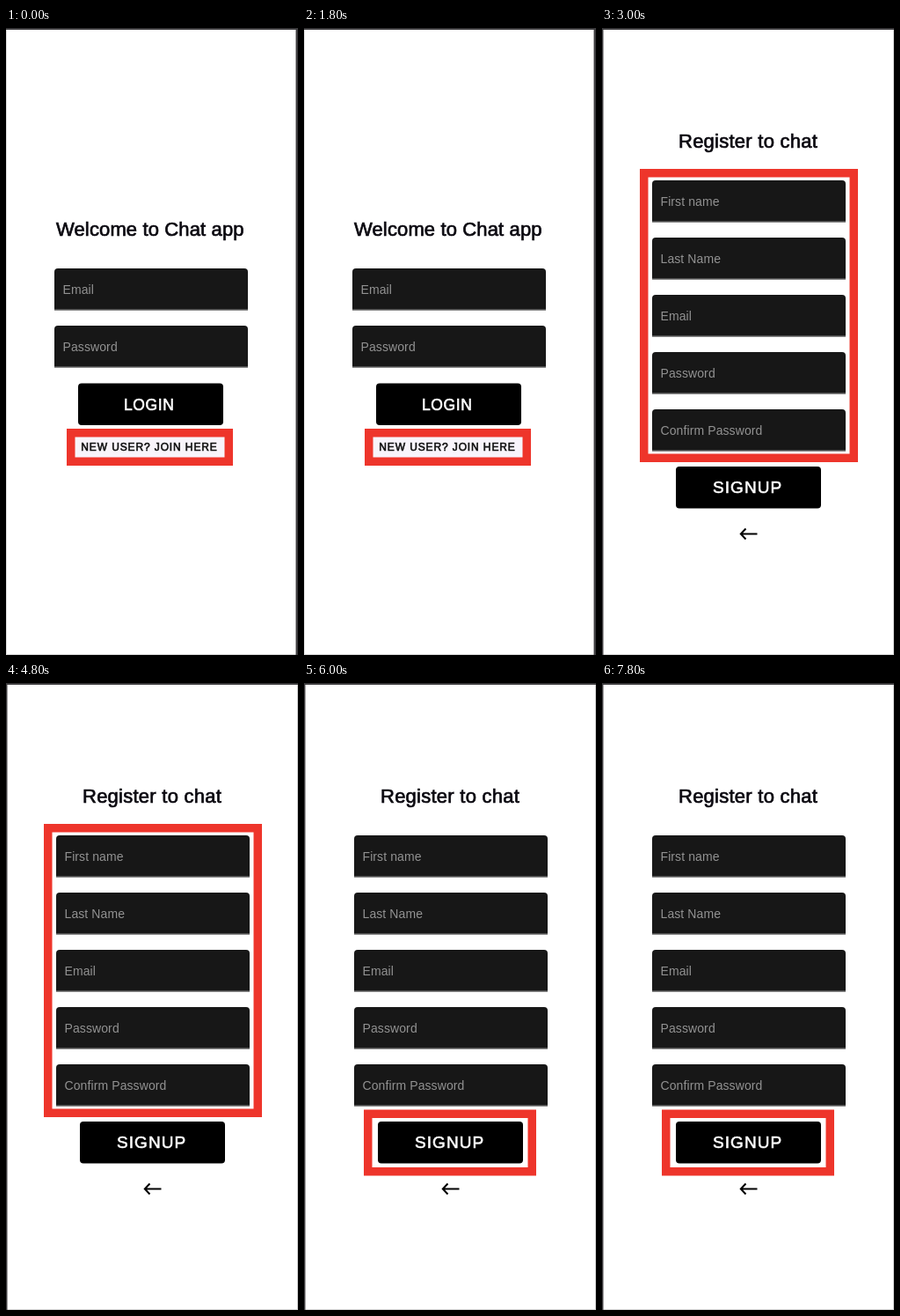
Write an HTML page with a canvas that moves like this. It is 332 px wide and 712 px high and loops after 9 s.

```html
<!DOCTYPE html>
<html lang="en">
<head>
<meta charset="utf-8">
<style>
  html, body { margin: 0; width: 100%; height: 100%; overflow: hidden; background: #fff; }
  canvas { display: block; }
</style>
</head>
<body>
<canvas width="332" height="712"></canvas>
<script>
const ctx = document.querySelector('canvas').getContext('2d');
const STEP = 3000;
const RED = '#ee352b', DARK = '#3a393b';

function rect(x, y, w, h, color, radius = 0) {
  ctx.fillStyle = color;
  ctx.beginPath();
  ctx.roundRect(x, y, w, h, radius);
  ctx.fill();
}

// A thin outline gives the text a medium weight.
function text(label, x, y, size, color, spacing = 0.1, outline = 0) {
  ctx.font = `${size}px "Liberation Sans", Arial, sans-serif`;
  ctx.letterSpacing = spacing + 'px';
  ctx.fillStyle = ctx.strokeStyle = color;
  ctx.fillText(label, x, y);
  if (outline) {
    ctx.lineWidth = outline;
    ctx.strokeText(label, x, y);
  }
}

function field(label, x, y) {
  rect(x, y, 220, 47.5, '#171717', [4, 4, 0, 0]);
  rect(x, y + 46.5, 220, 1, '#858585');
  text(label, x + 9.5, y + 29, 14, '#929292');
}

function button(label, x, y, textX, size, spacing) {
  rect(x, y, 165, 47.5, '#000', 4);
  text(label, textX, y + 30, size, '#fff', spacing, 0.6);
}

function highlight(x, y, w, h) {
  const border = 9.5;
  ctx.strokeStyle = RED;
  ctx.lineWidth = border;
  ctx.strokeRect(x + border / 2, y + border / 2, w - border, h - border);
}

function stage(left, leftWidth, right, rightWidth) {
  rect(0, 0, 332, 712, '#fff');
  rect(0, 711, 332, 1, '#d2d2d2');
  rect(0, 2, leftWidth, 710, left);
  rect(332 - rightWidth, 2, rightWidth, 710, right);
  rect(0, 0, 332, 2, DARK);
}

function login() {
  stage('#dcdcdc', 1, DARK, 2.5);
  text('Welcome to Chat app', 57, 235.5, 22, '#0b0910', 0.13, 0.7);
  field('Email', 55, 273);
  field('Password', 55, 338);
  button('LOGIN', 82, 403.5, 134, 17.5, 0.6);
  rect(78, 464, 172, 24, '#f8f4fb');
  text('NEW USER? JOIN HERE', 85.3, 479.5, 12, '#111', 0.88, 0.6);
  highlight(69, 455, 189, 42);
}

function register() {
  stage(DARK, 1.5, '#c4c4c4', 1);
  text('Register to chat', 87, 135.5, 22, '#0b0910', 0.25, 0.7);
  ['First name', 'Last Name', 'Email', 'Password', 'Confirm Password']
    .forEach((label, i) => field(label, 57, 173 + 65 * i));
  button('SIGNUP', 84, 498, 126, 19, 1.05);
  ctx.strokeStyle = '#000';
  ctx.lineWidth = 2;
  ctx.stroke(new Path2D('M176.5 574.5H158M163.5 568.5L157.8 574.5L163.5 580.5'));
}

function draw() {
  const scene = Math.floor(performance.now() / STEP) % 3;
  if (scene === 0) {
    login();
  } else {
    register();
    if (scene === 1) highlight(43, 160, 248, 333);
    else highlight(68, 484.5, 196, 75);
  }
  requestAnimationFrame(draw);
}
draw();
</script>
</body>
</html>
```
